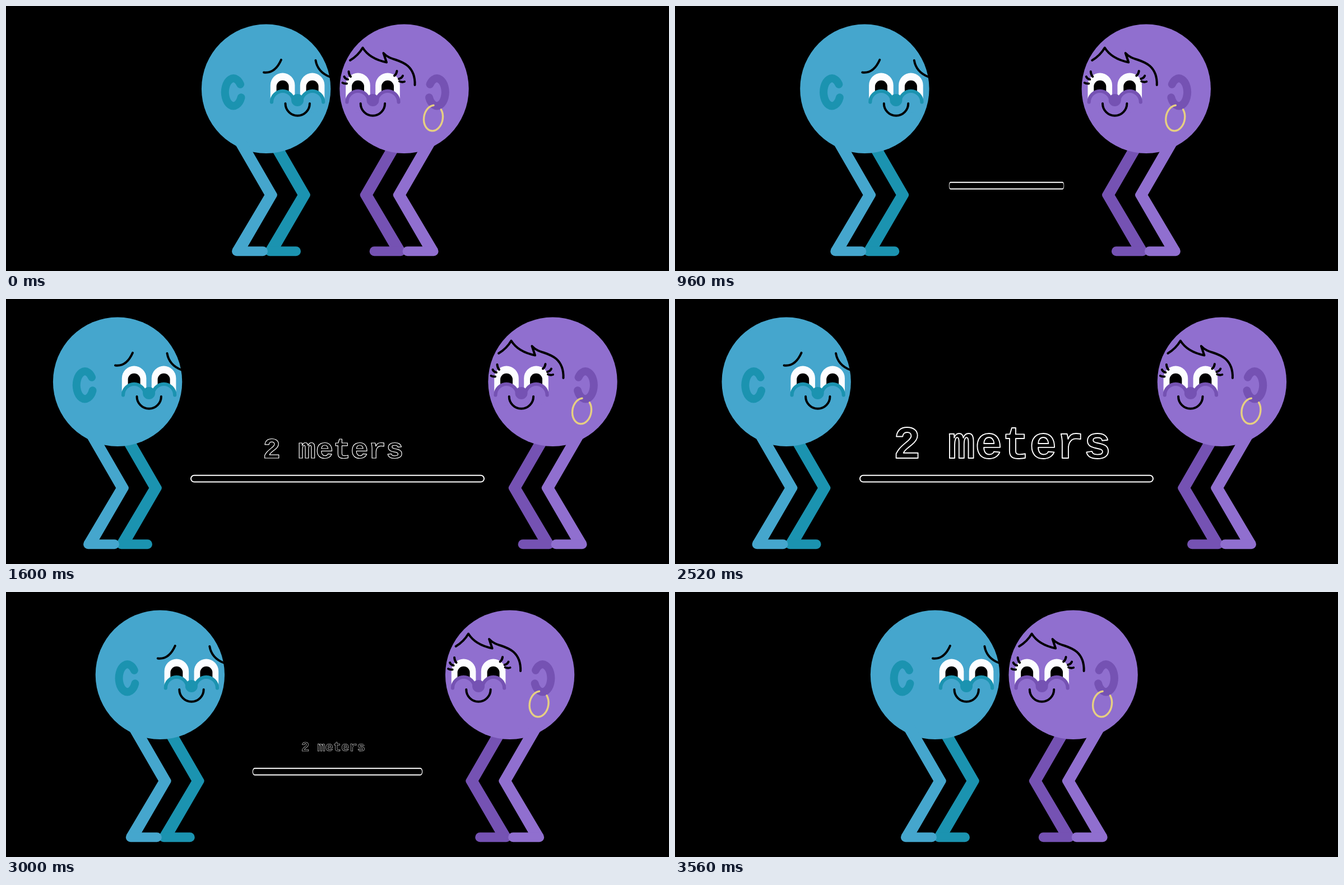
Recreate the animation shown at these times as an HTML page with a canvas. Size 1183x473 px, loop 4000 ms.

```html
<!DOCTYPE html>
<html lang="en">
<head>
<meta charset="utf-8">
<title>2 meters</title>
<style>
  html, body { margin: 0; width: 100%; height: 100%; overflow: hidden; background: #000; }
  canvas { display: block; width: 1183px; height: 473px; }
</style>
</head>
<body>
<canvas id="stage"></canvas>
<script>
const W = 1183, H = 473, LOOP = 4000, STEP = 40;
const canvas = document.getElementById('stage');
const ctx = canvas.getContext('2d');
const dpr = window.devicePixelRatio || 1;
canvas.width = Math.round(W * dpr);
canvas.height = Math.round(H * dpr);

const TAU = Math.PI * 2;
const MIRROR = 1174.6; // x of the right figure = MIRROR - x of the left one
const BLUE = { skin: '#45a6cd', dark: '#1b93b0' };
const PURPLE = { skin: '#906fcf', dark: '#7552b3' };

const smooth = u => u * u * (3 - 2 * u);
const linear = u => u;
const speedUp = u => Math.pow(u, 1.45);
const slowDown = u => 1 - Math.pow(1 - u, 1.45);

// Keys: [time, value, easing towards this key]
const blueTrack = [
  [588, 0], [1401, 288, smooth], [1600, 265, smooth],
  [2512, 265, linear], [2620, 292, smooth], [3570, 0, smooth]
];
const purpleTrack = [
  [592, 0], [1385, 292, smooth], [1590, 265, smooth],
  [2512, 265, linear], [2620, 291, smooth], [3570, 0, smooth]
];
const barTrack = [[600, 0], [1520, 1, linear], [2612, 1, linear], [3532, 0, linear]];
const textTrack = [
  [1100, 0], [1800, 1.055, speedUp], [1880, 1, smooth],
  [2510, 1, linear], [2590, 1.055, smooth], [3290, 0, slowDown]
];

function valueAt(track, t) {
  if (t <= track[0][0]) return track[0][1];
  for (let i = 1; i < track.length; i++) {
    const [t0, v0] = track[i - 1], [t1, v1, ease] = track[i];
    if (t < t1) return v0 + (v1 - v0) * ease((t - t0) / (t1 - t0));
  }
  return track[track.length - 1][1];
}

function disc(x, y, r, color) {
  ctx.fillStyle = color;
  ctx.beginPath();
  ctx.arc(x, y, r, 0, TAU);
  ctx.fill();
}

function line(path, color, width) {
  ctx.strokeStyle = color;
  ctx.lineWidth = width;
  ctx.stroke(path);
}

function oval(x, y, rx, ry, turn, from, to) {
  const p = new Path2D();
  p.ellipse(x, y, rx, ry, turn, from, to);
  return p;
}

// Round-topped door shape
function arch(x, top, r, bottom, color) {
  ctx.fillStyle = color;
  ctx.beginPath();
  ctx.moveTo(x - r, bottom);
  ctx.arc(x, top + r, r, Math.PI, TAU);
  ctx.lineTo(x + r, bottom);
  ctx.fill();
}

function leg(dx, color) {
  ctx.save();
  ctx.translate(dx, 0);
  ctx.fillStyle = color;
  ctx.beginPath();
  ctx.moveTo(402.1, 235);
  ctx.lineTo(461.2, 337.3);
  ctx.lineTo(404.1, 433.6);
  ctx.lineTo(411.5, 437.8);
  ctx.lineTo(426.5, 437.8);
  ctx.arcTo(484.8, 337.3, 425.7, 235, 5);
  ctx.lineTo(425.7, 235);
  ctx.fill();
  line(new Path2D('M411.5 437.8H458.5'), color, 17);
  ctx.restore();
}

function body({ skin, dark }) {
  leg(59, dark);
  disc(464.1, 147.7, 115.2, skin);
  leg(0, skin);

  line(oval(405.8, 153.8, 15, 24.5, 0, 0.4, TAU - 0.61), dark, 14);

  for (const x of [493.6, 546.6]) {
    arch(x, 119.6, 21.8, 165, '#fcfdff');
    arch(x, 132.8, 11, 155, '#000');
    disc(x, 171.5, 19.6, skin);
    line(oval(x, 171.5, 19.6, 19.6, 0, Math.PI, TAU), dark, 6.2);
  }
  disc(520.1, 168, 11, dark);
  line(oval(520.2, 174, 21.7, 21.7, 0, 0, Math.PI), '#000', 4);
}

const brows = new Path2D('M460 118.5Q480 121 491 96M552.5 97Q556 118 578 126.5');
const hair = new Path2D(
  'M614 97C624 91 631 84 636.5 74.5C646 90 662 97 679 100.5L673.5 84' +
  'C685 97 702 94 717 107C727 116 730 128 729.5 141');
const lashes = new Path2D(
  'M611.5 117Q612 123 615 126M603.5 126Q605 130 610 131M600.5 137Q603 139 608 138.5' +
  'M697.5 116Q697 121 693 124.5M708 124.5Q706 129 701 130M711 135Q707 136.5 702 134.5');
const earring = oval(762.5, 200, 16.8, 23, 0.17, -0.85, TAU - 1.77);

function drawBlue(shift) {
  ctx.save();
  ctx.translate(-shift, 0);
  body(BLUE);
  line(brows, '#000', 4);
  ctx.restore();
}

function drawPurple(shift) {
  ctx.save();
  ctx.translate(shift, 0);
  ctx.save();
  ctx.translate(MIRROR, 0);
  ctx.scale(-1, 1);
  body(PURPLE);
  ctx.restore();
  line(hair, '#000', 4);
  line(lashes, '#000', 4);
  line(earring, '#e6cf82', 3.4);
  ctx.restore();
}

function drawBar(scale) {
  if (scale <= 0) return;
  ctx.save();
  ctx.translate(591.5, 320.7);
  ctx.scale(scale, 1);
  const p = new Path2D();
  p.roundRect(-261.5, -5.9, 523, 11.8, 5.9);
  line(p, '#fff', 2);
  ctx.restore();
}

function drawLabel(scale) {
  if (scale <= 0) return;
  ctx.save();
  ctx.translate(584, 283.5);
  ctx.scale(scale, scale);
  ctx.font = 'bold 80.7px "Courier New", "Liberation Mono", monospace';
  ctx.textAlign = 'center';
  ctx.textBaseline = 'alphabetic';
  ctx.strokeStyle = '#fff';
  ctx.lineWidth = 1.9;
  ctx.strokeText('2 meters', 0, 0);
  ctx.restore();
}

function draw(t) {
  ctx.setTransform(dpr, 0, 0, dpr, 0, 0);
  ctx.fillStyle = '#000';
  ctx.fillRect(0, 0, W, H);
  ctx.lineCap = ctx.lineJoin = 'round';
  drawBar(valueAt(barTrack, t));
  drawLabel(valueAt(textTrack, t));
  drawBlue(valueAt(blueTrack, t));
  drawPurple(valueAt(purpleTrack, t));
}

const start = performance.now();
function tick() {
  const t = Math.max(0, performance.now() - start) % LOOP;
  draw(Math.floor(t / STEP) * STEP);
  requestAnimationFrame(tick);
}
tick();
</script>
</body>
</html>
```
